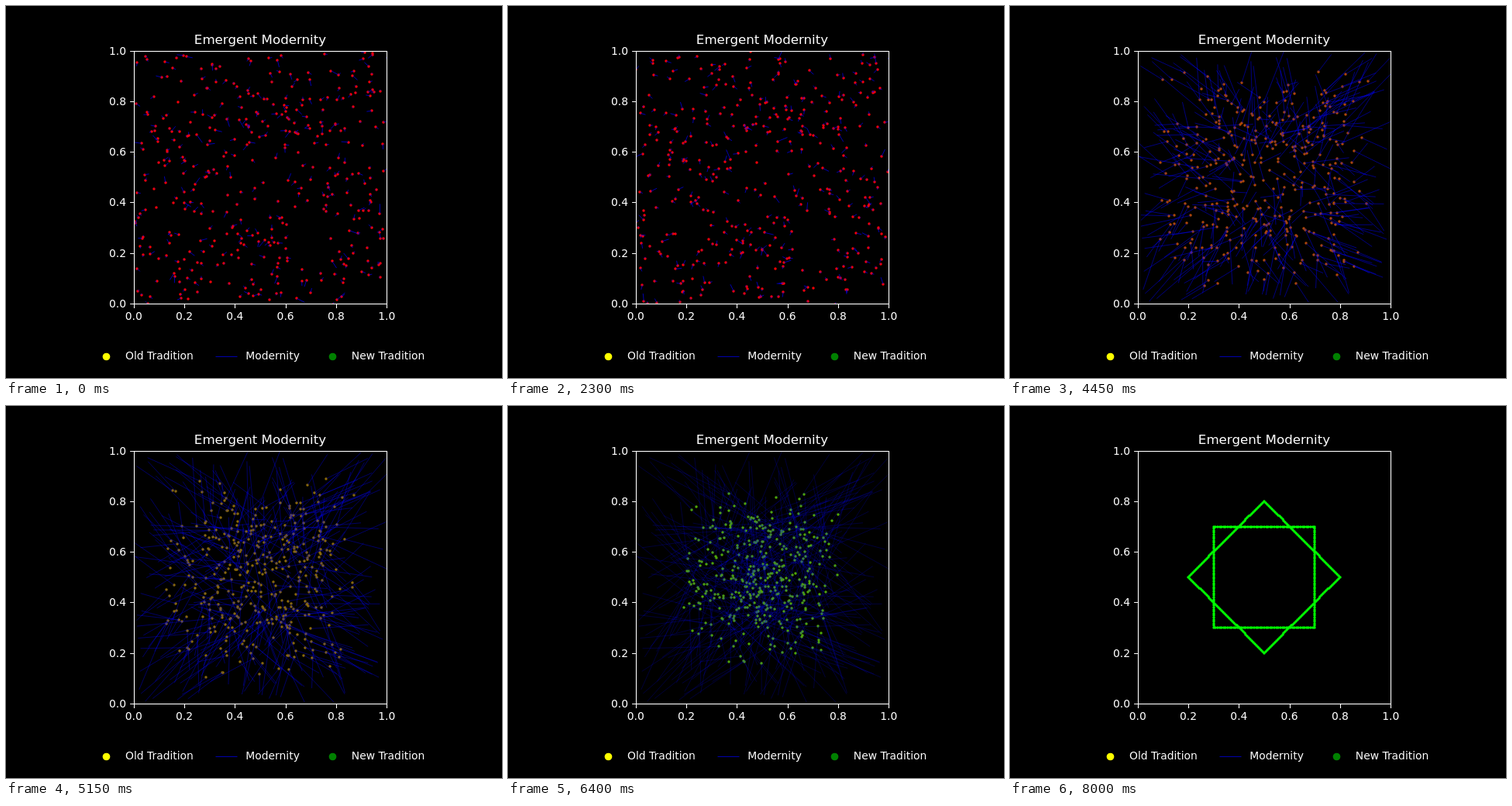
Write an HTML page that moves like this. It is 640 px wide and 480 px high and loops after 9500 ms.

```html
<!DOCTYPE html>
<html lang="en">
<head>
<meta charset="utf-8">
<title>Emergent Modernity</title>
<style>
  html, body { margin: 0; width: 100%; height: 100%; overflow: hidden; background: #000; }
  svg { display: block; }
  text { font-family: "DejaVu Sans", sans-serif; font-size: 13.89px; fill: #fff; }
  .title { font-size: 16.67px; }
</style>
</head>
<body>
<svg id="stage" width="640" height="480" viewBox="0 0 640 480">
  <clipPath id="inside"><rect x="165" y="58" width="327" height="327"/></clipPath>
  <g clip-path="url(#inside)">
    <path id="dots" fill="none" stroke-width="3.47" stroke-linecap="round"/>
    <g id="trails" stroke="#00f" stroke-width="0.69"/>
  </g>
  <g id="axes" fill="none" stroke="#fff" stroke-width="1.1">
    <rect x="165.5" y="58.5" width="326" height="326"/>
  </g>
  <g id="labels">
    <text class="title" x="328" y="49" text-anchor="middle">Emergent Modernity</text>
    <text x="154" y="456">Old Tradition</text>
    <text x="309.3" y="456">Modernity</text>
    <text x="445.8" y="456">New Tradition</text>
  </g>
  <circle cx="129.5" cy="452.5" r="4.86" fill="#ff0"/>
  <path d="M270.5 452.5H298.5" stroke="#00f" stroke-width="0.69"/>
  <circle cx="421.5" cy="452.5" r="4.86" fill="#008000"/>
</svg>
<script>
const LOOP = 9500, STEP = 50, LAST = 160, DRIFT_FROM = 60;
const COUNT = 400, PER_SIDE = 50, JITTER = 0.012;
const SIZE = 326.4, LEFT = 164.8, BOTTOM = 384;

const $ = id => document.getElementById(id);
const px = x => LEFT + x * SIZE;
const py = y => BOTTOM - y * SIZE;
const mix = (a, b, p) => a + (b - a) * p;

function add(parent, tag, attrs, content = '') {
  const el = document.createElementNS($('stage').namespaceURI, tag);
  for (const key in attrs) el.setAttribute(key, attrs[key]);
  el.textContent = content;
  parent.appendChild(el);
  return el;
}

function seeded(seed) {
  return () => {
    seed = (seed + 0x6D2B79F5) | 0;
    let t = Math.imul(seed ^ (seed >>> 15), 1 | seed);
    t = (t + Math.imul(t ^ (t >>> 7), 61 | t)) ^ t;
    return ((t ^ (t >>> 14)) >>> 0) / 4294967296;
  };
}

// Two independent normal deviates
function gaussPair(rand) {
  const r = Math.sqrt(-2 * Math.log(1 - rand())), a = 2 * Math.PI * rand();
  return [r * Math.cos(a), r * Math.sin(a)];
}

// Evenly spaced points along a square outline
function outline(corners) {
  return corners.flatMap(([x, y], i) => {
    const [nx, ny] = corners[(i + 1) % 4];
    return Array.from({ length: PER_SIDE }, (_, k) =>
      [mix(x, nx, k / PER_SIDE), mix(y, ny, k / PER_SIDE)]);
  });
}

for (let k = 0; k <= 5; k++) {
  const x = px(k / 5), y = py(k / 5), label = (k / 5).toFixed(1);
  add($('axes'), 'path', { d: `M${Math.round(x) + 0.5} 385v4.9M165 ${Math.round(y) + 0.5}h-4.9` });
  add($('labels'), 'text', { x, y: 405, 'text-anchor': 'middle' }, label);
  add($('labels'), 'text', { x: 155.1, y: Math.round(y) + 5, 'text-anchor': 'end' }, label);
}

const star = [
  ...outline([[0.3, 0.3], [0.7, 0.3], [0.7, 0.7], [0.3, 0.7]]),
  ...outline([[0.5, 0.2], [0.8, 0.5], [0.5, 0.8], [0.2, 0.5]])
];
const place = seeded(2024);
const origins = Array.from({ length: COUNT }, () => [place(), place()]);
const trails = origins.map(([x, y]) => add($('trails'), 'line', { x1: px(x), y1: py(y) }));

function draw(step) {
  const p = Math.max(0, (step - DRIFT_FROM) / (LAST - DRIFT_FROM));
  const rand = seeded(step * 7919 + 11);
  let d = '';
  origins.forEach(([x0, y0], i) => {
    const [gx, gy] = gaussPair(rand), noise = JITTER * (1 - p);
    const x = px(mix(x0, star[i][0], p) + gx * noise);
    const y = py(mix(y0, star[i][1], p) + gy * noise);
    d += `M${Math.round(x)} ${Math.round(y)}h0.001`;
    trails[i].setAttribute('x2', x);
    trails[i].setAttribute('y2', y);
  });
  $('dots').setAttribute('d', d);
  $('dots').setAttribute('stroke', `rgb(${Math.round(255 * (1 - p))},${Math.round(255 * p)},0)`);
  $('trails').setAttribute('stroke-opacity', 1 - p);
}

const start = performance.now();
let shown = -1;
function tick() {
  const step = Math.min(LAST, Math.floor(((performance.now() - start) % LOOP) / STEP));
  if (step !== shown) draw(shown = step);
  requestAnimationFrame(tick);
}
tick();
</script>
</body>
</html>
```
